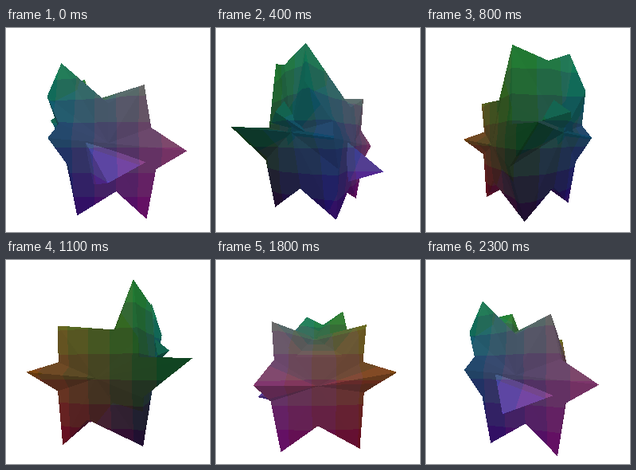
Write an HTML page with a canvas that moves like this. It is 256 px wide and 256 px high and loops after 2400 ms.

```html
<!DOCTYPE html>
<html>
<head>
<meta charset="utf-8">
<style>
html, body { margin: 0; width: 100%; height: 100%; overflow: hidden; background: #fff; }
canvas { display: block; width: 256px; height: 256px; }
</style>
</head>
<body>
<canvas id="stage" width="256" height="256"></canvas>
<script>
const SIZE = 256, CX = 128, CY = 138, DIST = 190, STEPS = 24;
const ctx = document.getElementById('stage').getContext('2d');
const image = ctx.createImageData(SIZE, SIZE);
const pixels = new Uint32Array(image.data.buffer);
const depth = new Float32Array(SIZE * SIZE);

// Corner columns, listed from the top spike to the bottom spike
const columns = [
  [[34, 50, 48], [42, 10, 43], [73, -12, 50], [46, -30, 45], [39, -82, 37]],
  [[-53, 85, 18], [-66, 45, 26], [-48, 14, 42], [-57, 0, 47], [-38, -28, 43], [-31, -78, 38]],
  [[-35, 87, -37], [-40, 30, -40], [-40, 12, -43], [-85, 10, -42], [-44, -25, -44], [-44, -76, -29]],
  [[40, 45, -48], [42, 8, -44], [60, -2, -68], [42, -22, -45], [38, -79, -42]]
];
// Walls between neighbouring columns: upper notch, middle, lower notch
const walls = [
  { top: [[0, 34, 42]], mid: [0, -5, 46], low: [8, -53, 40] },
  { top: [[-52, 72, -8]], mid: [-58, 5, 5], low: [-44, -50, 5] },
  { top: [[-18, 38, -44]], mid: [0, -8, -46], low: [10, -50, -42] },
  { top: [[46, 12, 22], [46, 12, -26]], mid: [50, -15, 0], low: [44, -54, 0] }
];

const faces = [];
function fan(hub, rim, closed, glow = 1) {
  const count = closed ? rim.length : rim.length - 1;
  for (let i = 0; i < count; i++) {
    faces.push({ points: [hub, rim[i], rim[(i + 1) % rim.length]], glow });
  }
}

walls.forEach(({ top, mid, low }, i) => {
  const a = columns[i], b = columns[(i + 1) % 4];
  fan(mid, [...a, low, ...[...b].reverse(), ...top], true);
  fan([-20, 45, 5], [b[0], ...top, a[0]], false);
  fan([0, -45, 0], [a.at(-1), low, b.at(-1)], false);
});
fan([0, -34, 76], [[-23, -2, 44], [36, -23, 46], [-14, -45, 44]], true, 1.25);
fan([-72, 22, 0], [[-56, 35, -5], [-56, 5, 20], [-58, 15, -20]], true, 1.1);

function project([x, y, z], cos, sin) {
  const rx = x * cos + z * sin, rz = z * cos - x * sin;
  const p = DIST / (DIST - rz);
  return { x: CX + rx * p, y: CY - y * p, p, view: [rx, y, rz] };
}

function shadeOf(a, b, c) {
  const u = b.view.map((v, i) => v - a.view[i]);
  const w = c.view.map((v, i) => v - a.view[i]);
  const n = [u[1] * w[2] - u[2] * w[1], u[2] * w[0] - u[0] * w[2], u[0] * w[1] - u[1] * w[0]];
  const len = Math.hypot(...n) * (n[2] < 0 ? -1 : 1) || 1;
  return 0.9 + 0.2 * n[1] / len + 0.18 * n[2] / len;
}

// Position sets the colour: x is red, height is green, z is blue
function channel(base, slope, v, shade) {
  const level = Math.round((base + slope * v) / 16) * 16;
  return Math.min(255, Math.max(14, level) * shade) | 0;
}

function fill({ points, glow }, cos, sin) {
  const [a, b, c] = points.map(q => project(q, cos, sin));
  const area = (b.x - a.x) * (c.y - a.y) - (c.x - a.x) * (b.y - a.y);
  if (Math.abs(area) < 0.01) return;
  const shade = shadeOf(a, b, c) * glow;
  const lo = k => Math.max(0, Math.floor(Math.min(a[k], b[k], c[k])));
  const hi = k => Math.min(SIZE - 1, Math.ceil(Math.max(a[k], b[k], c[k])));
  const x0 = lo('x'), x1 = hi('x'), y0 = lo('y'), y1 = hi('y');
  for (let y = y0; y <= y1; y++) {
    for (let x = x0; x <= x1; x++) {
      const px = x + 0.5, py = y + 0.5;
      const wb = ((px - a.x) * (c.y - a.y) - (c.x - a.x) * (py - a.y)) / area;
      const wc = ((b.x - a.x) * (py - a.y) - (px - a.x) * (b.y - a.y)) / area;
      const wa = 1 - wb - wc;
      if (wa < 0 || wb < 0 || wc < 0) continue;
      const p = wa * a.p + wb * b.p + wc * c.p;
      const at = y * SIZE + x;
      if (p <= depth[at]) continue;
      depth[at] = p;
      const mix = i => (wa * a.p * points[0][i] + wb * b.p * points[1][i] + wc * c.p * points[2][i]) / p;
      const red = channel(66, 0.75, mix(0), shade);
      const green = channel(62, 0.65, mix(1), shade);
      const blue = channel(68, 0.7, mix(2), shade);
      pixels[at] = (255 << 24 | blue << 16 | green << 8 | red) >>> 0;
    }
  }
}

function draw(step) {
  const angle = step / STEPS * 2 * Math.PI;
  pixels.fill(0xffffffff);
  depth.fill(0);
  for (const face of faces) fill(face, Math.cos(angle), Math.sin(angle));
  ctx.putImageData(image, 0, 0);
}

const start = performance.now();
let shown = -1;
function tick() {
  const step = Math.floor((performance.now() - start) / 100) % STEPS;
  if (step !== shown) draw(shown = step);
  requestAnimationFrame(tick);
}
tick();
</script>
</body>
</html>
```
